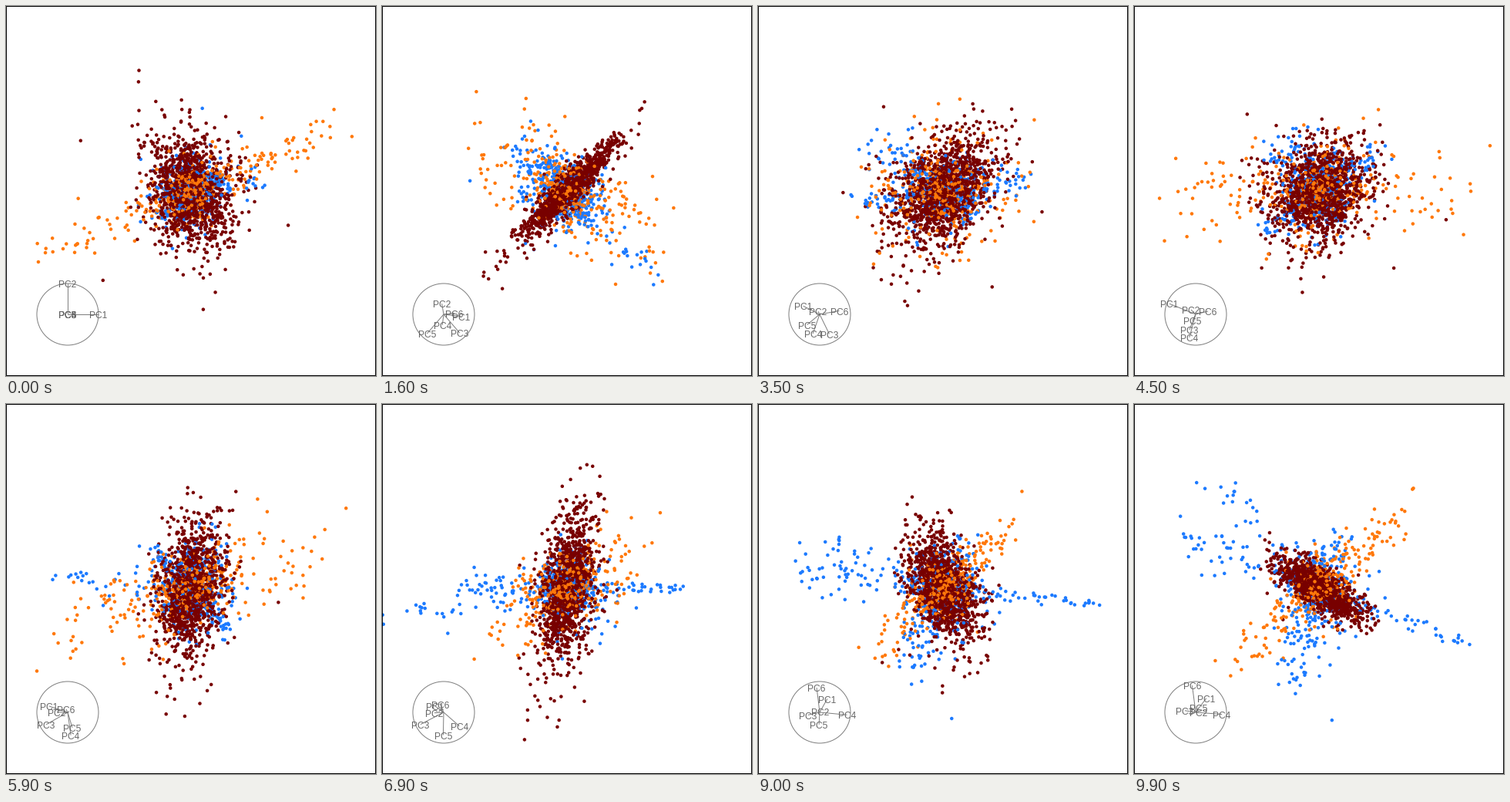
Recreate the animation shown at these times as a matplotlib script. Size 480x480 px, loop 10 s.

```python
import numpy as np
import matplotlib.pyplot as plt
from matplotlib.animation import FuncAnimation
from matplotlib.collections import LineCollection
from matplotlib.patches import Circle, Rectangle

SIZE, DPI, FRAMES = 480, 100, 100
PX = 72 / DPI
MID, HUB, RADIUS = np.array([240, 240]), np.array([80, 400]), 40
FLIP = np.array([1, -1])
RED, BLUE, ORANGE, GREY = "#780000", "#1c7aff", "#ff780a", "#7f7f7f"

plt.rcParams["font.family"] = "Liberation Sans"
rng = np.random.default_rng(12)

# Poses of the tour: where the tips of PC1..PC6 point, as x + yj
POSES = {
    0: [1, 1j, 0, 0, 0, 0],
    16: [.55-.05j, -.05+.35j, .5-.6j, -.05-.35j, -.55-.65j, .35+.05j],
    25: [.1+.1j, .1j, .6-.7j, -.1-.45j, -.55-.55j, .55+.1j],
    45: [-.85+.35j, -.15+.15j, -.2-.5j, -.2-.75j, -.1-.2j, .4+.1j],
    59: [-.6+.2j, -.35, -.7-.4j, .1-.75j, .15-.5j, -.05+.1j],
    80: [.1+.3j, -.1+.05j, -.45-.2j, .9-.15j, -.1-.75j, -.1+.5j],
    99: [.35+.45j, .1, -.35+.05j, .85-.05j, .1+.15j, -.1+.85j],
}


def orthonormal(m):
    u, _, vt = np.linalg.svd(m, full_matrices=False)
    return u @ vt


STEPS = np.array(list(POSES))
BASES = np.array([orthonormal(np.column_stack([np.real(z), np.imag(z)]))
                  for z in POSES.values()])
SPEEDS = np.gradient(BASES, STEPS, axis=0)


def basis(step):
    """Smooth path through the poses, kept orthonormal."""
    i = min(np.searchsorted(STEPS, step, side="right"), len(STEPS) - 1) - 1
    span = STEPS[i + 1] - STEPS[i]
    t = (step - STEPS[i]) / span
    ease = t * t * (3 - 2 * t)
    swing = t * (1 - t) * ((1 - t) * SPEEDS[i] - t * SPEEDS[i + 1])
    return orthonormal((1 - ease) * BASES[i] + ease * BASES[i + 1] + span * swing)


def aim(views):
    """Shortest 6D vector that looks like (x, y) in each of the given poses."""
    rows = np.vstack([BASES[k].T for k in views])
    return np.linalg.lstsq(rows, np.concatenate(list(views.values())), rcond=.05)[0]


def noise(n, sd, tail=.3):
    return rng.normal(0, sd, (n, 6)) * np.exp(tail * rng.normal(size=(n, 1)))


def spike(n, reach=1, power=5):
    return reach * rng.uniform(-1, 1, n) ** power


def red_cloud(n):
    axes = [aim({0: (16, -25), 1: (28, 29)}),
            aim({1: (0, 0), 2: (14, 0)}),
            aim({1: (0, 0), 2: (0, 8)}),
            aim({1: (0, 0), 4: (12, 0)})]
    spread = np.exp(.25 * rng.normal(size=(n, 1)) - .05)
    return rng.normal(size=(n, 4)) * spread @ axes + noise(n, 8)


def orange_cloud(n):
    wide = aim({0: (190, 80), 3: (-190, 15)})
    high = aim({0: (0, 0), 1: (-30, 80)})
    return np.outer(spike(n), wide) + np.outer(spike(n), high) + noise(n, 14)


def blue_cloud(n):
    streak = aim({5: (-200, -20), 6: (-190, 70)})
    branch = aim({2: (110, -90), 5: (-200, -20)})
    fan = aim({0: (0, 20), 1: (-65, 45), 6: (-35, -115)})
    return np.vstack([
        noise(n // 2, 20),
        np.outer(rng.random(n // 8) ** 1.4, streak) + noise(n // 8, 11),
        np.outer(rng.random(n // 10), -streak) + noise(n // 10, 4),
        np.outer(rng.random(n // 14) ** 1.4, branch) + noise(n // 14, 11),
        np.outer(rng.uniform(-.6, 1.1, n // 4), fan) + noise(n // 4, 15),
    ])


data, colors, depth = [], [], []
for cloud, color, low, high in [(blue_cloud(500), BLUE, 0, .8),
                                (orange_cloud(430), ORANGE, .1, 1.06),
                                (red_cloud(1250), RED, .3, 1)]:
    data.extend(cloud)
    colors.extend([color] * len(cloud))
    depth.extend(rng.uniform(low, high, len(cloud)))
order = np.argsort(depth)
data, colors = np.array(data)[order], np.array(colors)[order]

fig = plt.figure(figsize=(SIZE / DPI, SIZE / DPI), dpi=DPI, facecolor="white")
ax = fig.add_axes([0, 0, 1, 1])
ax.set(xlim=(0, SIZE), ylim=(SIZE, 0))
ax.axis("off")

ax.add_patch(Rectangle((.5, .5), SIZE - 1, SIZE - 1, fill=False, ec="black",
                       lw=PX, snap=False, zorder=5))
ax.add_patch(Circle(HUB, RADIUS, fill=False, ec=GREY, lw=PX))
spokes = ax.add_collection(LineCollection([], colors=GREY, linewidths=PX))
labels = [ax.text(*HUB, f"PC{i + 1}", size=12 * PX, color="#666666",
                  ha="center", va="center", zorder=3) for i in range(6)]
dots = ax.scatter(*data[:, :2].T, c=colors, s=(4.5 * PX) ** 2, linewidths=0, zorder=4)


def draw(step):
    b = basis(step)
    dots.set_offsets(MID + data @ b * FLIP)
    tips = HUB + RADIUS * b * FLIP
    spokes.set_segments([(HUB, tip) for tip in tips])
    for label, (x, y) in zip(labels, tips):
        label.set_position((x, y + 2.2))
    return [dots, spokes, *labels]


anim = FuncAnimation(fig, draw, frames=FRAMES, interval=100, repeat=True,
                     repeat_delay=0)
plt.show()
```
